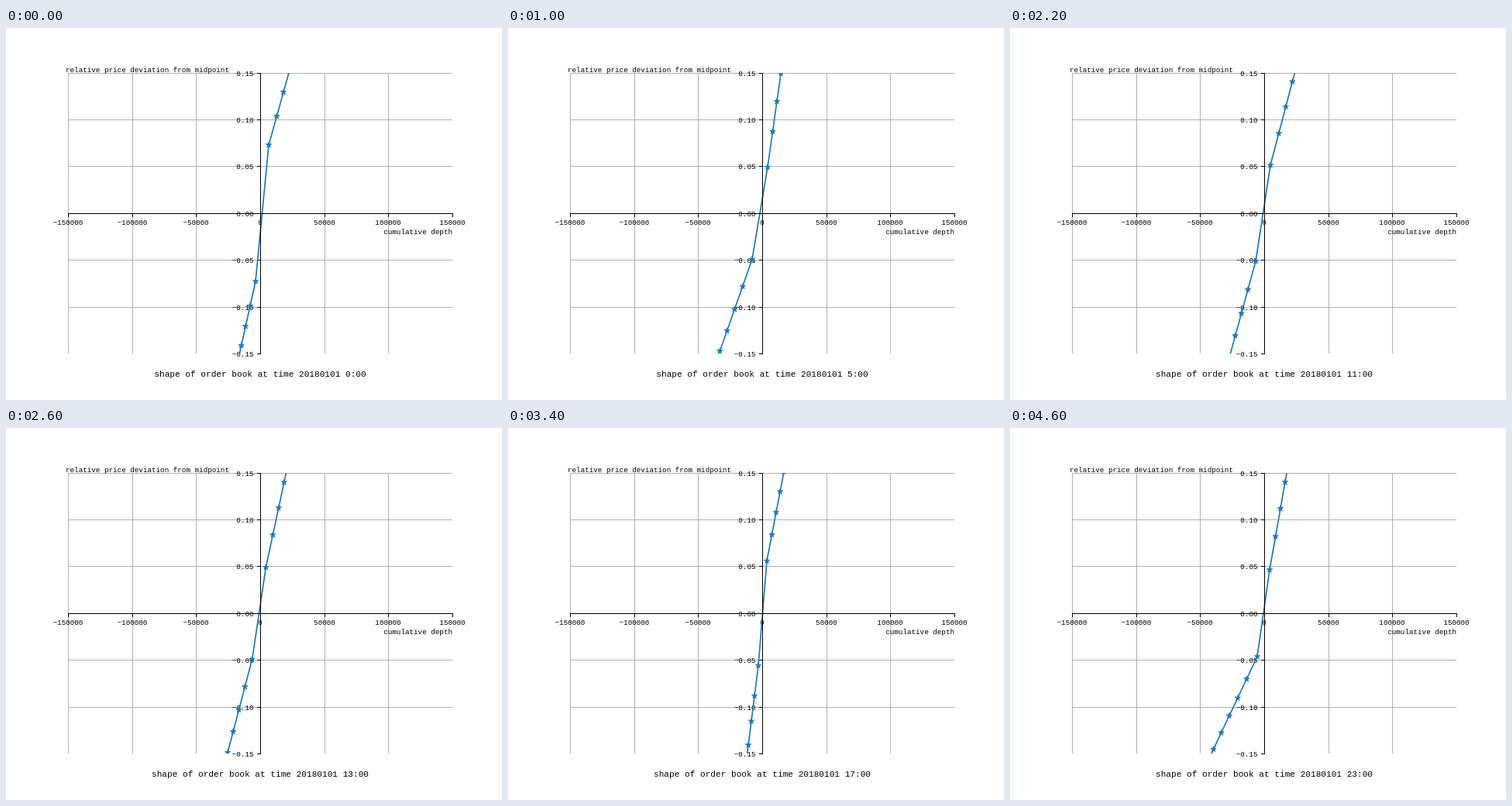
An HTML page for the animation above (4.8 s loop, 640 by 480 pixels).

```html
<!DOCTYPE html>
<html lang="en">
<head>
<meta charset="utf-8">
<title>Order book shape</title>
<style>
html, body { margin: 0; width: 100%; height: 100%; overflow: hidden; background: #fff; }
svg { display: block; font: 9.26px "Liberation Mono", "DejaVu Sans Mono", monospace; }
#title { font-size: 11.11px; }
#line { fill: none; stroke: #1f77b4; stroke-width: 1.7; stroke-linejoin: round; marker: url(#star); }
#star path { fill: #1f77b4; stroke: #1f77b4; stroke-linejoin: bevel; }
</style>
</head>
<body>
<svg id="stage" width="640" height="480" viewBox="0 0 640 480"></svg>
<script>
const HOUR_MS = 200, HOURS = 24, MID_X = 328, MID_Y = 239;
const stage = document.getElementById('stage');

// Key hours: best price offset, then for asks and bids: first depth, depth step, price step
const keys = [
  { hour: 0, shape: [88, 11, 10.3, 37, 6, 7, 31.5] },
  { hour: 5, shape: [59.5, 7, 6.5, 46, 13, 12.3, 35] },
  { hour: 9, shape: [77, 7, 8, 35.5, 9, 6.2, 27.3] },
  { hour: 11, shape: [62, 8, 10.8, 41, 11, 10, 36.5] },
  { hour: 14, shape: [58, 7, 8, 42, 10, 9, 35] },
  { hour: 15, shape: [52, 7, 7.8, 37.5, 21, 22, 31.5] },
  { hour: 17, shape: [67.5, 6, 6.5, 34, 5, 4.9, 39] },
  { hour: 23, shape: [56, 7, 7.6, 43, 9, 13.7, 29] }
];

function shapeAt(hour) {
  const next = Math.max(1, keys.findIndex(k => k.hour >= hour));
  const a = keys[next - 1], b = keys[next];
  const t = (hour - a.hour) / (b.hour - a.hour);
  return a.shape.map((v, i) => v + (b.shape[i] - v) * t);
}

// One side of the book: levels get gradually closer with distance
function side(sign, offset, first, depth, price) {
  return Array.from({ length: 7 }, (_, k) => {
    const n = k ** .88;
    return [MID_X + sign * (first + depth * n), MID_Y - sign * (offset + price * n)];
  });
}

function curve(hour) {
  const [offset, ...steps] = shapeAt(hour);
  const asks = side(1, offset, ...steps.slice(0, 3));
  const bids = side(-1, offset, ...steps.slice(3));
  return 'M' + [...asks.reverse(), ...bids].join('L');
}

const text = (x, y, str, anchor = 'start', id = '') =>
  `<text x="${x}" y="${y}" text-anchor="${anchor}" id="${id}">${str}</text>`;
const minus = str => str.replace('-', '−');

let grid = '', ticks = '', labels = '';
for (let i = -3; i <= 3; i++) {
  const x = Math.round(MID_X + i * 248 / 3) + .5;
  const y = Math.round(238.8 - i * 60.4) + .5;
  grid += `M${x} 58V420M80 ${y}H576`;
  ticks += `M${x} 239.5v4.5M328.5 ${y}h-4.5`;
  labels += text(x - .5, 254, minus(String(i * 50000)), 'middle')
    + text(319.5, y + 3, minus((i * .05).toFixed(2)), 'end');
}

const star = Array.from({ length: 10 }, (_, i) => {
  const r = i % 2 ? 1.45 : 3.8, a = i * Math.PI / 5;
  return [r * Math.sin(a), -r * Math.cos(a)].map(v => v.toFixed(2));
}).join('L');

stage.innerHTML = `
  <defs>
    <clipPath id="plot"><rect x="80" y="58" width="496" height="362"/></clipPath>
    <marker id="star" markerUnits="userSpaceOnUse" overflow="visible"><path d="M${star}Z"/></marker>
  </defs>
  <path d="${grid}" stroke="#b0b0b0" clip-path="url(#plot)"/>
  <path d="${ticks}" stroke="#000"/>
  ${labels}
  <g clip-path="url(#plot)"><path id="line"/></g>
  <path d="M328.5 58V421M80 239.5H577" stroke="#000"/>
  ${text(77, 57, 'relative price deviation from midpoint')}
  ${text(576, 266, 'cumulative depth', 'end')}
  ${text(328, 450, '', 'middle', 'title')}`;

const line = document.getElementById('line'), title = document.getElementById('title');
const start = performance.now();
function draw(now) {
  const hour = Math.floor(Math.max(0, now - start) / HOUR_MS) % HOURS;
  line.setAttribute('d', curve(hour));
  title.textContent = `shape of order book at time 20180101 ${hour}:00`;
  requestAnimationFrame(draw);
}
draw(start);
</script>
</body>
</html>
```
